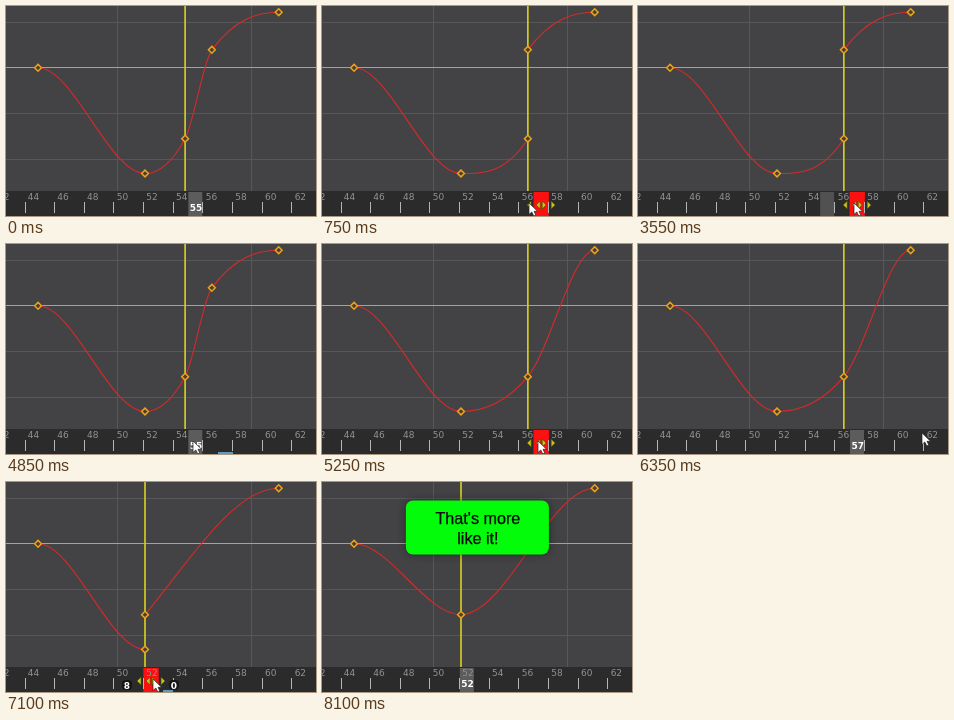
Write an HTML page that moves like this. It is 310 px wide and 210 px high and loops after 9850 ms.

```html
<!DOCTYPE html>
<html lang="en">
<head>
<meta charset="utf-8">
<title>Key nudge</title>
<style>
html, body { margin: 0; width: 100%; height: 100%; overflow: hidden; background: #434244; }
svg { display: block; width: 310px; height: 210px; }
.label { font: 9px "DejaVu Sans", sans-serif; fill: #929292; }
.now { font: bold 9px "DejaVu Sans", sans-serif; fill: #fff; text-anchor: middle; }
.note { font: 16.2px "Liberation Sans", Arial, sans-serif; text-anchor: middle; fill: #080808; stroke: #080808; stroke-width: .25; }
</style>
</head>
<body>
<svg id="stage" viewBox="0 0 310 210">
  <defs>
    <filter id="soft" x="-20%" y="-40%" width="140%" height="180%"><feGaussianBlur stdDeviation="4"/></filter>
  </defs>
  <rect width="310" height="210" fill="#434244"/>
  <g id="grid"></g>
  <path id="head" stroke="#d2ca22" stroke-width="1.7"/>
  <path id="curve" fill="none" stroke="#d62a2a" stroke-width="1.1"/>
  <path id="keys" fill="#49402f" stroke="#eba21d" stroke-width="1.5"/>
  <rect y="185" width="310" height="25" fill="#2b2b2b"/>
  <rect id="ghost" y="186" width="14" height="24" fill="#515151"/>
  <rect id="cell" y="186" height="24"/>
  <g id="ruler"></g>
  <text id="now" class="now" y="204.5"></text>
  <path id="handles" fill="#c9c414" stroke="#4a4608" stroke-width=".6"/>
  <g id="ends" class="now">
    <rect x="116" y="198" width="10" height="10" rx="4" fill="#151515"/>
    <rect x="163" y="198" width="10" height="10" rx="4" fill="#151515"/>
    <text x="121" y="206.5">8</text><text x="168" y="206.5">0</text>
  </g>
  <rect id="hover" y="208" height="2" fill="#5a9dbd"/>
  <g id="bad"></g>
  <g id="good"></g>
  <path id="cursor" d="M0 0V11.5L2.8 9L4.8 13L6.8 12L5 8.3H8.6Z" fill="#fff" stroke="#222" stroke-width=".7"/>
</svg>
<script>
const LOOP = 9850, TICK = 50;
const $ = id => document.getElementById(id);
const set = (id, attrs) => { for (const k in attrs) $(id).setAttribute(k, attrs[k]); };
const show = (id, on) => set(id, { visibility: on ? "visible" : "hidden" });
const within = (t, a, b) => t >= a && t < b;

const graphX = f => 139 + (f - 52) * 13.37;
const rulerX = f => 19 + (f - 44) * 14.83;

// time, frame under the selection
const nudges = [[0, 55], [600, 56], [750, 57], [3600, 55], [4950, 56], [5050, 57],
  [6750, 56], [6850, 55], [6950, 54], [7000, 53], [7050, 52]];
// time, x, y of the pointer tip
const pointer = [[0, 196, 212], [50, 196, 212], [300, 189, 196], [550, 189, 197], [850, 216, 197],
  [3750, 216, 197], [3900, 217, 212], [4200, 218, 212], [4500, 205, 200], [4800, 187, 197],
  [4900, 187, 197], [5100, 216, 197], [5600, 216, 197], [5650, 216, 212], [6300, 284, 212],
  [6350, 284, 189], [6600, 219, 197], [6700, 219, 197], [7100, 147, 197], [8050, 147, 197],
  [8100, 147, 212], [LOOP, 147, 212]];

function pointerAt(t) {
  const i = Math.max(1, pointer.findIndex(p => p[0] >= t));
  const [t0, x0, y0] = pointer[i - 1], [t1, x1, y1] = pointer[i];
  const u = (t - t0) / (t1 - t0);
  return [x0 + (x1 - x0) * u, y0 + (y1 - y0) * u];
}

const key = (frame, y, slope = 0) => ({ x: graphX(frame), y, slope });

function keysAt(t, frame) {
  const first = key(44, 61.8), low = key(52, 167.5), last = key(62, 6.2);
  if (t >= 7250) return [first, key(52, 132.7), last];
  const merged = within(t, 5250, LOOP);
  const moved = key(frame, 132.7, -1.21);
  if (merged) return [first, low, moved, last];
  moved.slope = Math.max(-1.84, -3 * 34.8 / (moved.x - low.x));
  return [first, low, moved, key(57, 43.8, -1.36), last];
}

function curvePath(keys) {
  let d = `M${keys[0].x} ${keys[0].y}`;
  for (let i = 1; i < keys.length; i++) {
    const a = keys[i - 1], b = keys[i], h = (b.x - a.x) / 3;
    d += h < 0.1 ? `M${b.x} ${b.y}`
      : `C${a.x + h} ${a.y + a.slope * h} ${b.x - h} ${b.y - b.slope * h} ${b.x} ${b.y}`;
  }
  return d;
}

const diamond = k => `M${k.x} ${k.y - 3.4}l3.4 3.4l-3.4 3.4l-3.4 -3.4z`;
const arrow = (x, dir, size) => `M${x + dir * size} 199l${-dir * size} -${size}v${2 * size}z`;

function buildNote(id, x, y, color, lines) {
  const box = `x="${x}" y="${y}" width="143" height="54" rx="7"`;
  $(id).innerHTML = `<rect ${box} fill="#000" opacity=".4" filter="url(#soft)"/>
    <rect ${box} fill="${color}"/>` +
    lines.map((s, i) => `<text class="note" x="${x + 72}" y="${y + 23.5 + i * 19.5}">${s}</text>`).join("");
}

function build() {
  const line = (d, color) => `<path d="${d}" stroke="${color}"/>`;
  $("grid").innerHTML = line("M111.5 0V185M245.5 0V185M0 16.5H310M0 107.5H310M0 153.5H310", "#575658") +
    line("M0 61.5H310", "#a2a2a2");
  let marks = "";
  for (let f = 42; f <= 62; f += 2) {
    const x = rulerX(f);
    marks += `<path d="M${Math.floor(x) + .5} 196V207" stroke="#b5b5b5"/>` +
      `<text class="label" x="${x + 2.7}" y="193.7">${f}</text>`;
  }
  $("ruler").innerHTML = marks;
  buildNote("bad", 132.8, 61.9, "#ff2806", ["Native nudge:", "keys stack up"]);
  buildNote("good", 83.9, 18.5, "#02fc0a", ["That's more", "like it!"]);
}

function draw(time) {
  const t = Math.floor((time % LOOP) / TICK) * TICK;
  const frame = nudges.filter(n => n[0] <= t).pop()[1];
  const red = within(t, 450, 3600) || within(t, 4900, 5400) || within(t, 6650, 7250);
  const keys = keysAt(t, frame);
  const x = rulerX(frame), mid = x + 7.4;

  set("head", { d: `M${graphX(frame)} 0V185` });
  set("curve", { d: curvePath(keys) });
  set("keys", { d: keys.map(diamond).join("") });
  set("cell", { x: red ? x - .3 : x + .2, width: red ? 15.4 : 14, fill: red ? "#fc1010" : "#5c5c5c" });
  set("ghost", { x: rulerX(55) });
  show("ghost", t === 3550);
  $("now").textContent = frame;
  set("now", { x: mid + .6 });
  show("now", !red);
  set("handles", { d: arrow(mid - 10, -1, 4) + arrow(mid - 1, -1, 4) + arrow(mid + 1, 1, 4) + arrow(mid + 10, 1, 4) });
  show("handles", red);
  show("ends", within(t, 7050, 7250));

  const early = within(t, 850, 1150), drag = within(t, 7050, 7250);
  set("hover", { x: early ? 197 : drag ? 157 : 212, width: early ? 30 : drag ? 10 : 15 });
  show("hover", early || drag || within(t, 4300, 4950));

  set("bad", { opacity: t < 3550 ? Math.min(1, Math.max(0, (t - 850) / 150)) : 0 });
  set("good", { opacity: Math.min(1, Math.max(0, (t - 7350) / 150)) });
  const [px, py] = pointerAt(t);
  set("cursor", { transform: `translate(${px} ${py})` });
}

build();
const start = performance.now();
function tick() {
  draw(performance.now() - start);
  requestAnimationFrame(tick);
}
tick();
</script>
</body>
</html>
```
